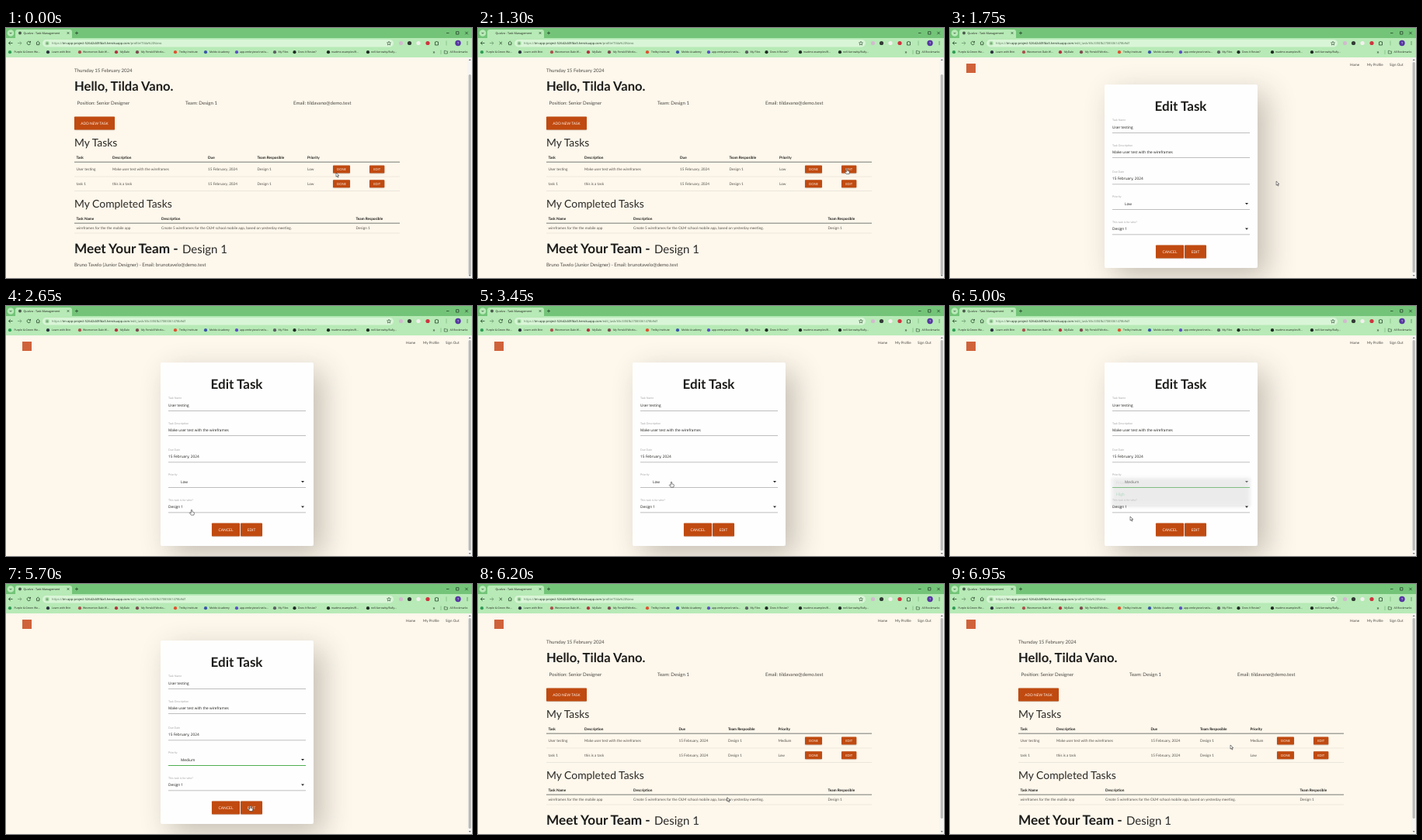
An HTML page with a canvas that plays this animation: 600 by 323 pixels, repeating every 7 s.

```html
<!DOCTYPE html>
<html lang="en">
<head>
<meta charset="utf-8">
<title>Task manager</title>
<style>
html, body { margin: 0; width: 100%; height: 100%; overflow: hidden; background: #fdf7ec; }
canvas { display: block; }
</style>
</head>
<body>
<canvas id="stage" width="600" height="323"></canvas>
<script>
const g = document.getElementById('stage').getContext('2d');
g.textRendering = 'geometricPrecision';

const LOOP = 7000;
const UI = '"Open Sans", "Noto Sans", sans-serif';
const SITE = 'Lato, "Open Sans", sans-serif';
const INK = '#1d1c19', SOFT = '#4b4843', ORANGE = '#c04a10', PAPER = '#fdf7ec', GREEN = '#35b46c';

// Page states and their times
const T = { load1: 1250, edit: 1400, open: 3700, pick: 4900, load2: 5800, back: 6200 };

// Cursor tip: time, x, y
const PATH = [
  [0, 425, 187], [400, 426, 187], [1000, 475, 181.5], [1500, 475, 181.5],
  [2100, 330, 225], [2650, 239, 263], [3000, 239, 263], [3450, 249, 227],
  [3800, 249, 227], [4300, 247, 253.5], [4700, 232, 272], [5000, 232, 272],
  [5600, 314.5, 286.5], [6050, 314.5, 286.5], [6700, 361, 208], [7000, 361, 208]
];

function text(s, x, y, size, { color = INK, weight = 400, font = SITE, align = 'left' } = {}) {
  g.font = `${weight} ${size}px ${font}`;
  g.fillStyle = color;
  g.textAlign = align;
  g.fillText(s, x, y + size * 0.35);
  return g.measureText(s).width;
}

function box(x, y, w, h, color, r = 0) {
  g.fillStyle = color;
  g.beginPath();
  g.roundRect(x, y, w, h, r);
  g.fill();
}

function dot(x, y, r, color) {
  g.fillStyle = color;
  g.beginPath();
  g.arc(x, y, r, 0, 7);
  g.fill();
}

function stroke(d, color = '#27452c', width = 0.8) {
  g.strokeStyle = color;
  g.lineWidth = width;
  g.stroke(new Path2D(d));
}

function fill(d, color) {
  g.fillStyle = color;
  g.fill(new Path2D(d));
}

function shadow(color, blur, x, y, draw) {
  g.save();
  g.shadowColor = color;
  g.shadowBlur = blur;
  g.shadowOffsetX = x;
  g.shadowOffsetY = y;
  draw();
  g.restore();
}

function button(label, x, y, w, h, size) {
  shadow('rgba(0,0,0,.22)', 1.5, 0, 0.6, () => box(x, y, w, h, ORANGE, 0.8));
  text(label, x + w / 2, y + h / 2, size, { color: '#fff3ea', align: 'center' });
}

function cross(x, y, r) {
  stroke(`M${x - r} ${y - r}l${2 * r} ${2 * r}m0 ${-2 * r}l${-2 * r} ${2 * r}`);
}

const BOOKMARKS = [
  [5, '#2f9c55', 10.5, 'Purple & Green Wo...'], [54, '#2b3040', 59, 'Learn with Brin'],
  [95, '#a9504f', 99, 'Wexmorton Dale W...'], [142, '#b5303f', 147, 'MyDale'],
  [169, '#7c4a50', 174, 'My Fenskill Works...'], [218, '#e0502f', 223, 'Trelby Institute'],
  [257, '#3a55a8', 262, 'Moldo Academy'], [297, '#5b4fc8', 301, 'app.embryievel.net/u...'],
  [346, '#5c5f63', 350.5, 'My Files'], [371.5, '#1f2a24', 376, 'Does It Resize?'],
  [415, '#1f2a24', 419, 'readme-examples/R...'], [466, '#1f2a24', 470, 'nell-farrowby/Bully...']
];

function browser(path, loading) {
  box(0, 0, 600, 14, '#73c478');
  box(0, 13, 600, 25, '#b7eab6');
  dot(6, 6.5, 4.3, '#b7eab6');
  stroke('M4.6 5.9l1.4 1.4l1.4-1.4');
  box(12, 2, 73, 14, '#b7eab6', 3);
  if (!loading) dot(18, 6.5, 2, '#4a5a4d');
  g.save();
  g.beginPath();
  g.rect(22, 0, 48, 13);
  g.clip();
  text('Quolvo - Task Management for', 22.5, 6.5, 3.7, { font: UI });
  g.restore();
  cross(80, 6.5, 1.2);
  stroke('M89 6.5h4m-2-2v4M567 6.5h3.5M579.5 4.7h3.4v3.4h-3.4z');
  cross(593, 6.5, 1.7);

  stroke('M8.5 19.5h-5m2.2-2.2l-2.2 2.2l2.2 2.2');
  stroke('M15 19.5h5m-2.2-2.2l2.2 2.2l-2.2 2.2', '#6f9a72');
  if (loading) cross(29.3, 19.5, 1.7);
  else stroke('M31.2 18.4a2.2 2.2 0 1 0 .2 1.7M31.5 16.9v1.8h-1.8');
  stroke('M38.8 19.3l2.4-2.2l2.4 2.2M39.6 19v2.7h3.2v-2.7');
  box(47, 15, 452, 9.5, '#d9f5d7', 4.7);
  dot(53, 19.7, 3, '#b7eab6');
  stroke('M51.5 18.9h3m-3 1.7h3', '#27452c', 0.6);
  let x = 59;
  for (const [s, color] of [['https://', '#5d7a60'], ['tm-app-project-526d2d49fda5.herokuapp.com', '#182a1b'], [path, '#4f6c53']])
    x += text(s, x, 19.7, 4, { font: UI, color });
  stroke('M493 17.2l.7 1.6l1.8.2l-1.3 1.2l.4 1.8l-1.6-.9l-1.6.9l.4-1.8l-1.3-1.2l1.8-.2z', '#27452c', 0.6);
  [[508.5, '#d3b9d0'], [519.5, '#333b36'], [531, '#f4efef'], [543, '#cf3340']]
    .forEach(([cx, c]) => dot(cx, 19.5, 2.6, c));
  stroke('M552.5 18h1.1q.8-2 1.6 0h1.3v4h-4z');
  stroke('M567 16.5v6', '#78b57b', 0.7);
  dot(582, 19.5, 3.7, '#5736a3');
  text('T', 582, 19.5, 4, { font: UI, color: '#fff', align: 'center' });
  [17.7, 19.5, 21.3].forEach(y => dot(594, y, 0.55, '#27452c'));

  for (const [ix, color, tx, s] of BOOKMARKS) {
    dot(ix, 31.2, 2.1, color);
    text(s, tx, 31.2, 3.45, { font: UI });
  }
  text('»', 549.5, 30.8, 6, { font: UI });
  stroke('M560 28.5v5.5', '#78b57b', 0.7);
  stroke('M564.3 29.4h1.5l.6.6h2v3h-4.1z', '#27452c', 0.6);
  text('All Bookmarks', 571.5, 31.2, 3.45, { font: UI });
}

function scrollbar(top, height) {
  box(594.5, 38, 5.5, 285, '#f6f5f2');
  box(595.6, top, 3.2, height, '#b9b9b7', 1.5);
  fill('M597.2 40l1.5 2h-3zM597.2 321l1.5-2h-3z', '#777');
}

function nav() {
  box(21, 46, 12, 12, '#d0623a');
  [['Home', 515], ['My Profile', 537], ['Sign Out', 566]].forEach(([s, x]) => text(s, x, 47.8, 4.6, { color: SOFT }));
}

function row(cells, xs, y, weight, rule) {
  const head = weight > 400;
  cells.forEach((s, i) => text(s, xs[i], y, 4.72, { weight, color: head ? INK : '#55514b' }));
  box(88, rule, 419, head ? 0.8 : 0.5, head ? '#4b5350' : '#d9d5cc');
}

// Coordinates are for the unscrolled page
function profile(scroll, priority) {
  const title = (s, y) => text(s, 88, y, 13.9, { color: '#2b2925' });
  const line = (s, x, y) => text(s, x, y, 6.15, { color: SOFT });
  g.save();
  g.translate(0, -scroll);
  nav();
  line('Thursday 15 February 2024', 88, 75.3);
  text('Hello, Tilda Vano.', 88, 95.5, 16.6, { weight: 700 });
  line('Position: Senior Designer', 91.5, 117.3);
  line('Team: Design 1', 231, 117.3);
  line('Email: tildavano@demo.test', 370, 117.3);
  button('ADD NEW TASK', 88, 134.5, 52, 17, 4.75);

  title('My Tasks', 168);
  const d = scroll ? 0 : -1.6;
  const xs = [90.5, 137, 260 + d, 323.5 + d, 388 + d];
  row(['Task', 'Description', 'Due', 'Team Resposible', 'Priority'], xs, 187, 700, 192.8);
  row(['User testing', 'Make user test with the wireframes', '15 February, 2024', 'Design 1', priority], xs, 202.5, 400, 211.8);
  row(['task 1', 'this is a task', '15 February, 2024', 'Design 1', 'Low'], xs, 221, 400, 230.3);
  for (const y of [197.6, 216.2]) {
    button('DONE', 421, y, 22, 10, 4.1);
    button('EDIT', 468, y, 19.3, 10, 4.1);
  }

  title('My Completed Tasks', 247.2);
  const cols = [90.5, 200, 450.5];
  row(['Task Name', 'Description', 'Team Resposible'], cols, 266, 700, 271.8);
  row(['wireframes for the the mobile app', 'Create 5 wireframes for the OLM school mobile app, based on yesterday meeting.', 'Design 1'], cols, 278.5, 400, 284.8);

  text('Meet Your Team -', 88, 305.3, 17.2, { weight: 700 });
  text('Design 1', 227, 305.3, 15, { color: '#2b2925' });
  line('Bruno Tavelo (Junior Designer) - Email: brunotavelo@demo.test', 88, 325.8);
  g.restore();
  scrollbar(scroll ? 60 : 44, 259);
}

function field(label, value, y, select, focus) {
  text(label, 209, y - 15.8, 3.6, { color: '#a5a5a5' });
  text(value, label === 'Priority' ? 225 : 209, y - 6.8, 4.75, { font: UI });
  box(209, y, 177, focus ? 1 : 0.7, focus ? '#4caf50' : '#a9a9a9');
  if (select) fill(`M380 ${y - 8}h4l-2 2.2z`, '#222');
}

function dropdown(k, cy) {
  g.save();
  g.globalAlpha = k;
  const h = 63 * (0.4 + 0.6 * k);
  shadow('rgba(0,0,0,.35)', 4, 0, 1.5, () => box(209, 220, 177, h, '#fff'));
  g.beginPath();
  g.rect(209, 220, 177, h);
  g.clip();
  const hover = Math.floor((cy - 220) / 15.75);
  ['Priority', 'High', 'Low', 'Medium'].forEach((s, i) => {
    const y = 220 + i * 15.75;
    if (i === 2 || i && i === hover) box(209, y, 177, 15.75, '#e9ecea');
    text(s, 214, y + 7.9, 5.2, { color: i ? GREEN : '#b8b8b8' });
  });
  g.restore();
}

function editForm(t, cy) {
  nav();
  shadow('rgba(70,60,50,.3)', 36, 12, 12, () => box(199, 73, 197, 237, '#fefefe', 2));
  text('Edit Task', 297, 100.6, 17, { weight: 700, align: 'center' });
  field('Task Name', 'User testing', 135);
  field('Task Description', 'Make user test with the wireframes', 167.3);
  field('Due Date', '15 February, 2024', 201.6);
  field('Priority', t < T.pick ? 'Low' : 'Medium', 234, true, t >= T.open);
  field('This task is for who?', 'Design 1', 266.6, true);
  button('CANCEL', 265, 280.5, 36, 17, 4.9);
  button('EDIT', 302, 280.5, 28, 17, 4.8);
  const k = Math.min((t - T.open) / 150, 1 - (t - T.pick) / 150, 1);
  if (k > 0) dropdown(k, cy);
  scrollbar(44, 272);
}

function cursorAt(t) {
  const i = PATH.findIndex(p => p[0] > t);
  const [t0, x0, y0] = PATH[i - 1], [t1, x1, y1] = PATH[i];
  const u = (t - t0) / (t1 - t0), e = u * u * (3 - 2 * u);
  return [x0 + (x1 - x0) * e, y0 + (y1 - y0) * e];
}

function cursor(x, y, hand) {
  const d = hand
    ? 'M-.7 .6q.7-1.1 1.4 0v2.3l2.2.6q.6.2.5 1l-.5 2.6h-3.6l-2-2.7q.3-1 1.2-.3l.8.6z'
    : 'M0 0v5.2l1.2-1.1l.9 2l.9-.4l-.9-2h1.7z';
  g.save();
  g.translate(x, y);
  fill(d, '#fff');
  stroke(d, '#111', 0.5);
  g.restore();
}

const within = (x, y, [l, t, r, b]) => x >= l && x <= r && y >= t && y <= b;
const HOT = {
  profile: [[421, 178, 443, 186.5], [468, 178, 487, 188]],
  edit: [[209, 220, 386, 235], [209, 252, 386, 267], [265, 280, 330, 298]],
  menu: [[209, 220, 386, 283]]
};

function draw(now) {
  const t = now % LOOP;
  const editing = t >= T.edit && t < T.back;
  const [x, y] = cursorAt(t);
  box(0, 0, 600, 323, PAPER);
  if (editing) editForm(t, y);
  else profile(t < T.edit ? 20 : 0, t < T.edit ? 'Low' : 'Medium');
  const loading = t >= T.load1 && t < T.edit + 100 || t >= T.load2 && t < T.back + 100;
  browser(editing ? '/edit_task/65c33f4fb27083061478b9df' : '/profile/Tilda%20Vano', loading);
  const zone = !editing ? 'profile' : t >= T.open && t < T.pick ? 'menu' : 'edit';
  cursor(x, y, t < T.back && HOT[zone].some(r => within(x, y, r)));
}

const start = performance.now();
function tick() {
  draw(performance.now() - start);
  requestAnimationFrame(tick);
}
tick();
</script>
</body>
</html>
```
